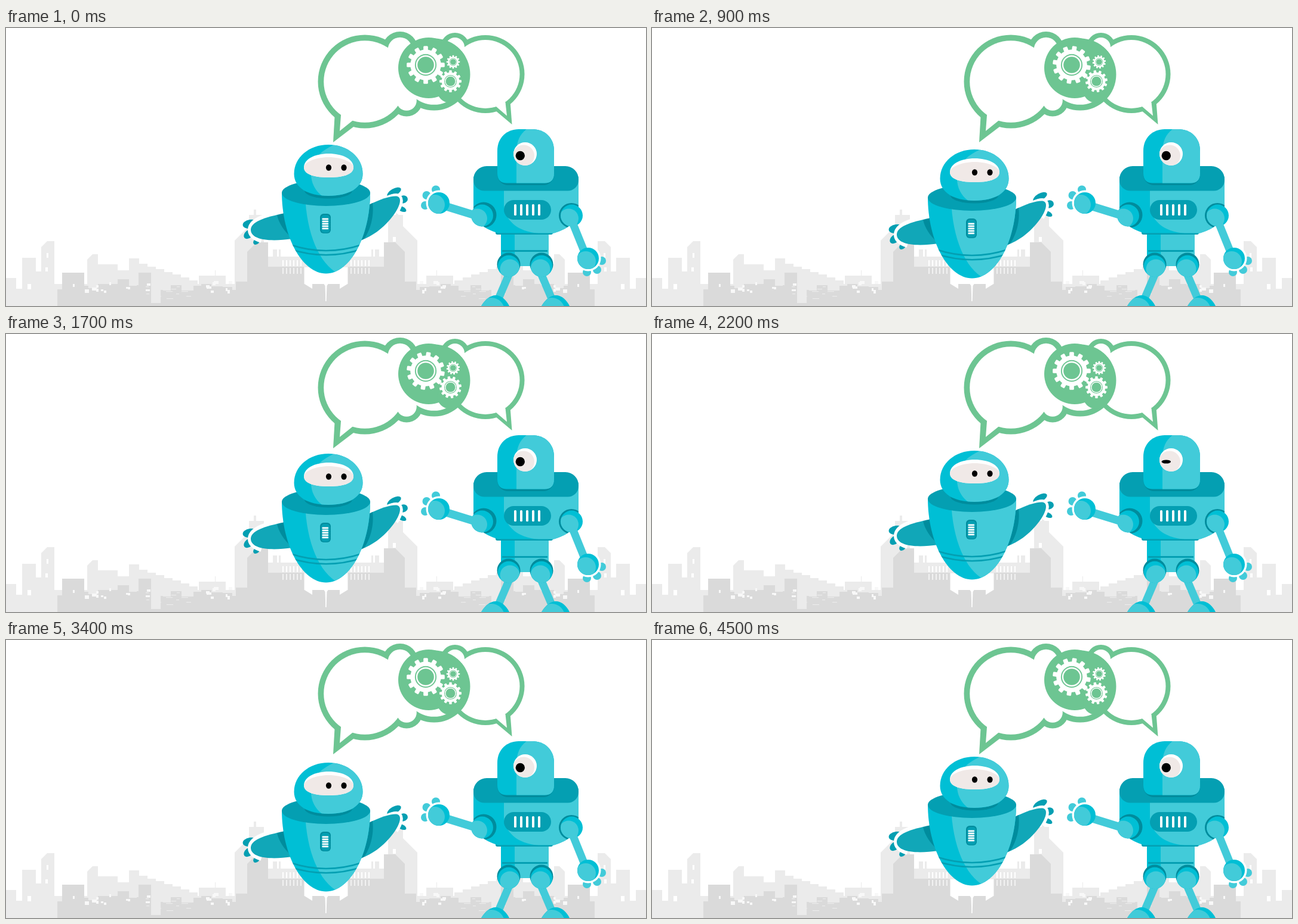
Recreate the animation shown at these times as an HTML page with a canvas. Size 1072 by 467 pixels, loop 4.6 s.

```html
<!DOCTYPE html>
<html lang="en">
<head>
<meta charset="utf-8">
<title>Robots talking</title>
<style>
html, body { margin: 0; width: 100%; height: 100%; overflow: hidden; background: #fff; }
canvas { display: block; }
</style>
</head>
<body>
<canvas id="stage" width="1072" height="467"></canvas>
<script>
const ctx = document.getElementById('stage').getContext('2d');
const W = 1072, H = 467, FRAME = 100, FRAMES = 46, TAU = Math.PI * 2;
const CYAN = '#00bfd5', LIGHT = '#42cbd9', TEAL = '#049fb2', DEEP = '#008c9d', WING = '#11a7b8';
const GREEN = '#6dc592', WHITE = '#fff', EYE = '#f0e9e7', BLACK = '#000';
const PALE = '#ebebeb', GREY = '#dadada';

function fill(d, color) {
  ctx.fillStyle = color;
  ctx.fill(new Path2D(d));
}
function stroke(d, color, width) {
  ctx.strokeStyle = color;
  ctx.lineWidth = width;
  ctx.stroke(new Path2D(d));
}
function oval(x, y, rx, ry, color, deg = 0) {
  ctx.fillStyle = color;
  ctx.beginPath();
  ctx.ellipse(x, y, rx, ry, deg * Math.PI / 180, 0, TAU);
  ctx.fill();
}
function disc(x, y, r, color) { oval(x, y, r, r, color); }
function box(x, y, w, h, color, r = 0) {
  ctx.fillStyle = color;
  ctx.beginPath();
  ctx.roundRect(x, y, w, h, r);
  ctx.fill();
}
function within(d, draw) {
  ctx.save();
  ctx.clip(new Path2D(d));
  draw();
  ctx.restore();
}
function withinDisc(x, y, r, draw) {
  ctx.save();
  ctx.beginPath();
  ctx.arc(x, y, r, 0, TAU);
  ctx.clip();
  draw();
  ctx.restore();
}
// A shape with a lighter part laid over it.
function twoTone(d, light) {
  fill(d, CYAN);
  within(d, () => fill(light, LIGHT));
}
function ball(x, y, r, dx, dy, lightR) {
  disc(x, y, r, CYAN);
  withinDisc(x, y, r, () => disc(x + dx, y + dy, lightR, LIGHT));
}

// ---- city ----
function seeded(seed) {
  return () => (seed = seed * 16807 % 2147483647) / 2147483647;
}
// A building down to the ground, its left corner cut off by `cut`.
function tower(x, w, top, color, cut = 0) {
  fill(`M${x} ${H}V${top + cut}L${x + cut} ${top}H${x + w}V${H}Z`, color);
}
// A row of buildings of random width and height.
function row(from, to, top, spread, color, rand) {
  for (let x = from; x < to;) {
    const w = Math.min(12 + Math.round(rand() * 12), to - x);
    tower(x, w, top + Math.round(rand() * spread), color);
    x += w;
  }
}
function windows(count, from, to, top, depth, color, rand) {
  for (let i = 0; i < count; i++) {
    const x = from + rand() * (to - from), y = top + rand() * depth;
    box(Math.round(x), Math.round(y), 3 + Math.round(rand() * 5), 3 + Math.round(rand() * 3), color);
  }
}
function halfCity() {
  const rand = seeded(29);
  tower(0, 17, 420, PALE);
  tower(17, 33, 438, PALE);
  tower(27, 23, 386, PALE);
  tower(50, 9, 409, PALE);
  tower(59, 22, 358, PALE, 10);
  tower(136, 18, 380, PALE, 9);
  tower(154, 33, 397, PALE);
  tower(187, 19, 407, PALE);
  tower(206, 17, 387, PALE);
  for (let x = 223; x < 308; x += 14) tower(x, 14, 396 + Math.round((x - 223) * 0.33), PALE);
  tower(81, 303, 430, PALE);
  tower(323, 45, 416, PALE);
  tower(350, 1, 407, PALE);
  tower(383, 24, 333, PALE, 24);
  tower(407, 25, 314, PALE);
  tower(415, 4, 305, PALE);
  tower(432, 81, 384, PALE);
  tower(447, 7, 372, PALE);
  tower(457, 3, 372, PALE);

  tower(86, 451, 441, GREY);
  row(86, 385, 429, 12, GREY, rand);
  tower(94, 37, 411, GREY);
  tower(187, 19, 422, GREY);
  tower(222, 21, 411, GREY);
  tower(385, 114, 426, GREY);
  tower(404, 35, 360, GREY, 16);
  tower(439, 60, 401, GREY);
  tower(499, 38, 430, GREY);

  box(36, 430, 6, 9, WHITE);
  box(68, 378, 3, 8, WHITE);
  box(66, 402, 4, 7, WHITE);
  box(419, 351, 5, 8, WHITE);
  box(243, 440, 16, 22, PALE);
  windows(12, 100, 240, 424, 18, '#f8f8f8', rand);
  windows(8, 328, 384, 424, 18, '#f8f8f8', rand);
  for (let i = 0; i < 14; i++) box(234 + (i * 17) % 76, 434 + (i % 6) * 4, 5 + i % 3 * 3, 1.2, PALE);
  for (let x = 463; x < 498; x += 6) {
    box(x, 390, 2, 10, WHITE);
    box(x, 403, 2, 10, '#f2f2f2');
  }
  fill('M500 402H536V429H513V438L500 430Z', WHITE);
  fill('M531 428H537V459H535.4L534.5 433Z', WHITE);
}
function city() {
  ctx.save();
  halfCity();
  ctx.translate(W, 0);
  ctx.scale(-1, 1);
  halfCity();
  ctx.restore();
}

// ---- speech bubbles ----
const leftCloud = [[601, 90, 78.5], [660, 36, 30], [717, 78, 60.5], [671, 122, 26.5]];
const rightCloud = [[803, 77.5, 65.5], [752, 32, 24]];

function bubble(cloud, edge, tail, inner) {
  cloud.forEach(([x, y, r]) => disc(x, y, r, GREEN));
  fill(tail, GREEN);
  cloud.forEach(([x, y, r]) => disc(x, y, r - edge, WHITE));
  fill(inner, WHITE);
}
function gear(x, y, r, turn) {
  ctx.save();
  ctx.translate(x, y);
  ctx.rotate(turn);
  disc(0, 0, r * 0.81, WHITE);
  for (let i = 0; i < 12; i++) {
    box(-r * 0.12, -r, r * 0.24, r * 0.3, WHITE, r * 0.05);
    ctx.rotate(TAU / 12);
  }
  ctx.restore();
  disc(x, y, r * 0.57, GREEN);
  disc(x, y, r * 0.51, WHITE);
  disc(x, y, r * 0.435, GREEN);
}
function talk(turn) {
  bubble(leftCloud, 9.7, 'M551 140L548 192L582 166L600 150Z',
    'M561.5 140L559 173L580 156L600 140ZM655 95H685V112H660Z');
  bubble(rightCloud, 8, 'M819 138L847.5 162L844.5 123L825 120Z',
    'M821 132L839 147.5L836.5 125L820 115Z');
  // The bubbles' overlap is solid.
  disc(708, 67, 51, GREEN);
  withinDisc(...leftCloud[2], () => {
    rightCloud.forEach(([x, y, r]) => disc(x, y, r, GREEN));
    disc(744, 104, 22, GREEN);
  });
  gear(703, 62, 31.8, turn);
  gear(749, 57, 11.2, -turn);
  gear(744.5, 89.5, 18.4, -turn);
}

// ---- floating robot ----
const shell = 'M462 276C462 350 496 412.5 536 412.5C576 412.5 610 350 610 276Z';
const dome = 'M482.5 245C482.5 217 508 196 540 196C572 196 597.5 217 597.5 245' +
  'C597.5 268 575 282 540 282C505 282 482.5 268 482.5 245Z';
const visor = top => `M499 234C499 ${top + 9} 518 ${top} 540.5 ${top}C563 ${top} 582 ${top + 9} 582 234` +
  'C582 247 562 251 540.5 251C519 251 499 247 499 234Z';

function wings() {
  oval(409, 329.5, 12.5, 7.5, TEAL, -8);
  oval(407, 346, 10, 6.5, TEAL, -40);
  oval(420, 358, 7, 4.5, TEAL, -45);
  stroke('M436 317C418 323 410 330 410 339C410 347 415 352 428 356', WHITE, 10);
  fill('M474 310C440 316 411 324 410 338C409 355 438 360 480 354Z', WING);
  fill('M454 314.5L466 311L478 352Q459 335 454 314.5Z', DEEP);

  oval(650, 276, 13, 6, TEAL, -30);
  oval(665, 288, 8, 6.5, TEAL, -15);
  oval(663, 304, 8, 4, TEAL, 25);
  stroke('M637 288C648 283 655 282 657 284C662 287 660 298 652 310', WHITE, 10);
  fill('M606 298C630 286 648 281 656 283C664 286 660 302 643 322C630 337 615 349 594 357Z', WING);
  fill('M606 298L614 294C617 318 609 341 600 354L594 357Z', DEEP);
}
function floater(dy) {
  ctx.save();
  ctx.translate(0, dy);
  wings();
  twoTone(shell, 'M501 280C503 345 525 397 557 413H620V280Z');
  within(shell, () => {
    stroke('M476 364Q536 384 596 364', TEAL, 2.4);
    stroke('M476 371.5Q536 391 596 371.5', TEAL, 2.4);
  });
  box(526, 312, 18, 33, DEEP, 6);
  box(528, 314, 14.5, 30, TEAL, 5);
  for (let i = 0; i < 5; i++) box(529.5, 319.5 + i * 4, 10.5, 2.7, WHITE, 0.6);
  oval(536, 277, 74, 22, TEAL);
  oval(540, 273, 40, 13.5, DEEP);
  twoTone(dome, 'M555 194C526 205 511 223 511 245C511 262 519 275 532 284H600V194Z');
  fill(visor(211), WHITE);
  fill(visor(217), EYE);
  oval(540.5, 234.5, 4.6, 5.2, BLACK);
  oval(566, 234.5, 4.6, 5.2, BLACK);
  ctx.restore();
}

// ---- standing robot ----
const chest = 'M783 250V300C783 325 800 337 824 344.5H918C942 337 959 325 959 300V250Z';
const sole = 'M796 467C803 455 812 449 820 449C830 449 838 457 843 467Z';
const head = 'M823 206C823 184 839 170 859 170H882C902 170 918 184 918 206V244Q918 260.5 902 260.5' +
  'H839Q823 260.5 823 244Z';

function foot(x) {
  ctx.save();
  ctx.translate(x - 820, 0);
  fill(sole, CYAN);
  within(sole, () => disc(813, 475, 22, LIGHT));
  ctx.restore();
}
function hand(x, y, fingers) {
  fingers.forEach(([fx, fy]) => disc(fx, fy, 7, LIGHT));
  disc(x, y, 21.5, WHITE);
}
function raisedArm(turn) {
  ctx.save();
  ctx.translate(797, 316);
  ctx.rotate(turn);
  ctx.translate(-797, -316);
  hand(725, 294, [[720, 271.5], [704.5, 281], [702, 298]]);
  ball(797.5, 315, 18.5, -8, 5, 16.5);
  stroke('M790 316L735 299', LIGHT, 13.5);
  ball(725, 294, 18, -7, 3, 17);
  ctx.restore();
}
function stander(armTurn, squint) {
  stroke('M844 410L824 457', LIGHT, 13);
  stroke('M895 410L915 457', LIGHT, 13);
  foot(820);
  foot(921);

  box(829, 344, 80, 56, LIGHT);
  fill('M829 344H852V374C852 388 856 396 862 400H829Z', CYAN);
  box(831, 373, 76, 3, TEAL);
  for (const [x, dx] of [[842, 2], [897, -2]]) {
    disc(x, 397, 19.5, DEEP);
    ball(x, 400, 18.2, dx, 5, 16.5);
  }

  box(820, 340, 96, 7, TEAL, 3);
  twoTone(chest, 'M834 250V298C836 322 855 342 892 345H960V250Z');
  within(chest, () => {
    disc(800, 314, 21.5, DEEP);
    disc(947, 315, 21, DEEP);
  });
  box(783, 232, 176, 41.5, TEAL, [22, 22, 18, 18]);

  box(834, 289, 79, 33, TEAL, 16.5);
  for (let i = 0; i < 5; i++) box(851 + i * 10, 296, 4, 19, WHITE, 1.5);

  box(823, 200, 95, 64, DEEP, 18);
  twoTone(head, 'M873 169C861 178 855 190 855 208V262H920V169Z');
  disc(869.5, 211.5, 19.5, WHITE);
  withinDisc(869.5, 211.5, 19.5, () => disc(867, 214.5, 18, EYE));
  oval(861.3, 214.5, 7.7, 7.7 * squint, BLACK);

  raisedArm(armTurn);
  hand(975, 387, [[998, 391], [990, 406], [973, 410]]);
  ball(947.5, 315, 18.5, -5, 5, 16.5);
  stroke('M947 322L968 374', LIGHT, 13);
  ball(975, 387, 18, -4, 5, 17);
}

// Smooth bump from 0 to 1 and back between two steps.
function bump(step, from, to) {
  return step > from && step < to ? Math.sin((step - from) / (to - from) * Math.PI) : 0;
}
function draw(now) {
  const step = Math.floor(now / FRAME) % FRAMES;
  const hover = Math.round(10 * Math.max(0, 1 - Math.abs(step % 23 - 11) / 11));
  const blink = Math.max(bump(step, 1, 5), bump(step, 19, 23));
  const wave = bump(step, 27, 34) * 0.12;
  const gearTurn = step % 2 * 0.157;
  ctx.fillStyle = WHITE;
  ctx.fillRect(0, 0, W, H);
  city();
  talk(gearTurn);
  floater(hover);
  stander(wave, 1 - 0.85 * blink);
}

const start = performance.now();
function tick() {
  draw(performance.now() - start);
  requestAnimationFrame(tick);
}
tick();
</script>
</body>
</html>
```
